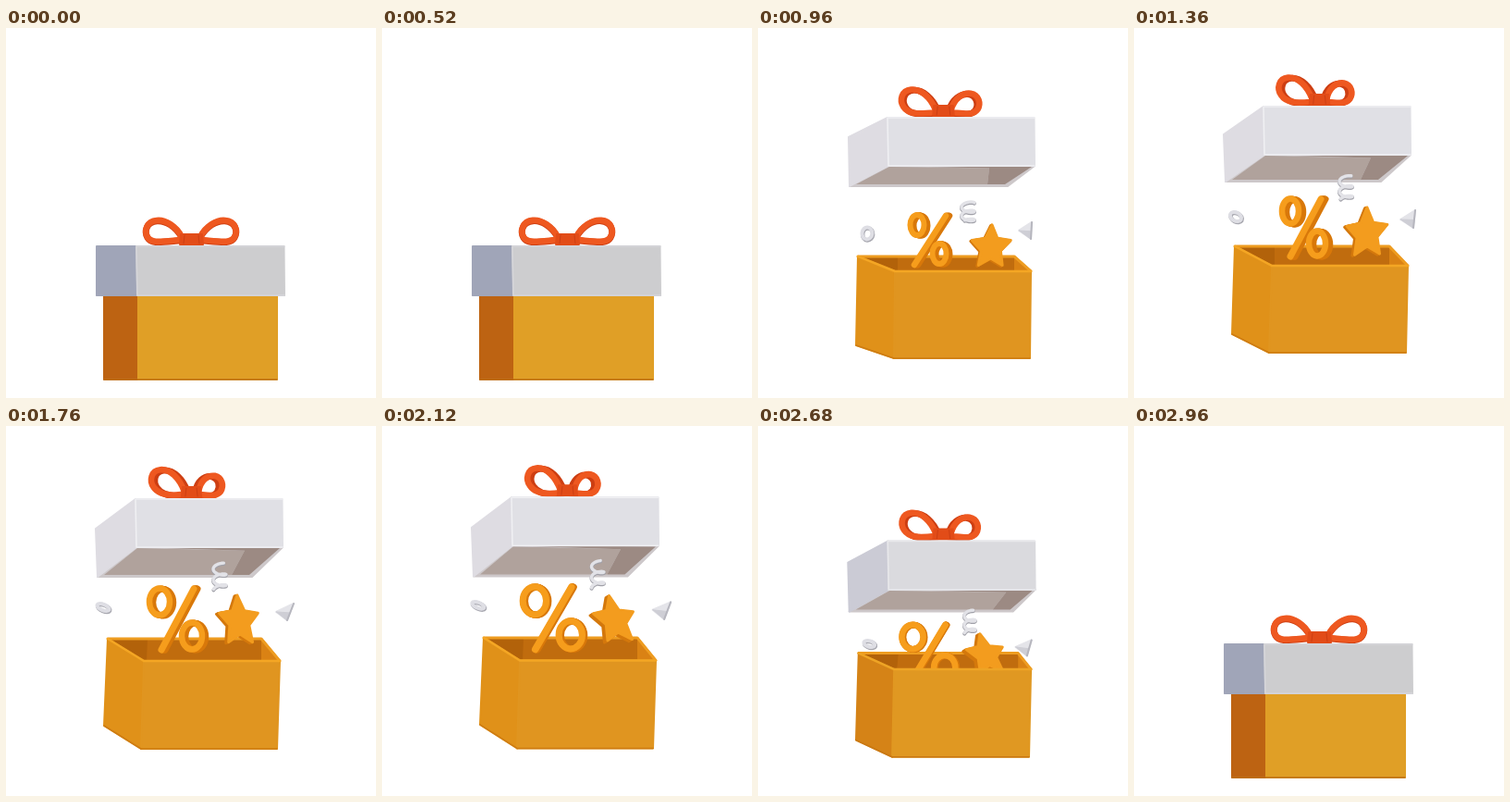
Write an HTML page with a canvas that moves like this. It is 400 by 400 pixels and loops after 3.36 s.

```html
<!DOCTYPE html>
<html lang="en">
<head>
<meta charset="utf-8">
<title>Gift box</title>
<style>
html, body { margin: 0; width: 100%; height: 100%; overflow: hidden; background: #fff; }
canvas { display: block; width: 400px; height: 400px; }
</style>
</head>
<body>
<canvas id="stage" width="400" height="400"></canvas>
<script>
const ctx = document.getElementById('stage').getContext('2d');
const LOOP = 3360;
const TIMES = [520, 960, 1360, 1760, 2520, 2960];
const TAU = Math.PI * 2;

// current segment and eased position inside it
let seg = 0, pos = 0;

function setTime(t) {
  if (t <= TIMES[0] || t >= TIMES[5]) { seg = 0; pos = 0; return; }
  seg = 0;
  while (t >= TIMES[seg + 1]) seg++;
  const u = (t - TIMES[seg]) / (TIMES[seg + 1] - TIMES[seg]);
  if (seg === 0) pos = 1 - Math.pow(1 - Math.pow(u, 1.3), 2.2);
  else if (seg === 4) pos = u * u * (3 - 2 * u);
  else pos = u + 0.33 * u * (1 - u);
}

const lerp = (a, b, u) => a + (b - a) * u;

// value for: closed, then four open poses, then closed again
function key(...v) {
  return lerp(v[seg], seg === 4 ? v[0] : v[seg + 1], pos);
}

function tint(a, b, u) {
  return 'rgb(' + a.map((c, i) => Math.round(lerp(c, b[i], u))).join(',') + ')';
}

function poly(pts, fill, round = 2) {
  ctx.beginPath();
  pts.forEach(([x, y]) => ctx.lineTo(x, y));
  ctx.closePath();
  ctx.fillStyle = ctx.strokeStyle = fill;
  ctx.lineWidth = round;
  ctx.fill();
  if (round) ctx.stroke();
}

function line(pts, color, width) {
  ctx.beginPath();
  pts.forEach(([x, y]) => ctx.lineTo(x, y));
  ctx.strokeStyle = color;
  ctx.lineWidth = width;
  ctx.stroke();
}

function lidShape() {
  const top = key(235, 96, 84, 78, 75) + 1;
  const base = key(290, 150, 138, 132, 129) - 1;
  return {
    top, base,
    sideTop: key(235, 117, 114, 110, 108) + 1,
    sideBase: key(290, 172, 167, 164, 163) - 1,
    xl: key(98, 98, 97, 97, 97), xb: key(98, 99, 99, 99, 99),
    xf: key(141, 140, 140, 140, 140),
    xr: key(301, 299, 299, 299, 299),
    xBack: key(300, 270, 267, 266, 265)
  };
}

function boxShape() {
  return {
    top: key(285, 262, 256, 253, 252) + 1,
    base: key(380, 357, 351, 349, 348),
    back: key(285, 246, 235, 229, 227) + 1,
    sideBase: key(380, 343, 331, 324, 322),
    xl: key(106, 108, 109, 110, 110), xlb: 106,
    xf: key(143, 148, 149, 149, 149), xfb: key(143, 147, 146, 146, 146),
    xr: key(293, 295, 296, 296, 296), xrb: key(293, 294, 294, 293, 293),
    xBack: key(293, 277, 276, 276, 276)
  };
}

function lidInside(l) {
  poly([[l.xf, l.base], [l.xr, l.base], [l.xBack, l.sideBase], [l.xb, l.sideBase]], 'rgb(205,200,202)');
  const h = l.sideBase - l.base;
  if (h < 4) return;
  const cx = key(292, 250, 256, 258, 258), cy = l.base + h * 0.12;
  poly([[l.xf + 2, l.base + 1], [cx, cy], [l.xBack - 22, l.sideBase - 2], [l.xb + 7, l.sideBase - 2]], 'rgb(176,162,156)', 0);
  poly([[l.xf, l.base], [l.xr - 3, l.base + 1], [l.xBack - 3, l.sideBase - 2],
    [l.xBack - 22, l.sideBase - 2], [cx, cy]], 'rgb(156,138,131)', 0);
}

function lidOutside(l, open) {
  const side = tint([160, 165, 184], [222, 220, 226], open);
  const front = tint([205, 205, 207], [224, 224, 229], open);
  poly([[l.xf, l.top], [l.xf + 1, l.base], [l.xb, l.sideBase], [l.xl, l.sideTop]], side);
  poly([[l.xf, l.top], [l.xr - 0.5, l.top], [l.xr, l.base], [l.xf + 1, l.base]], front);
  const edge = tint([214, 214, 218], [240, 240, 243], open);
  line([[l.xr, l.top], [l.xf, l.top], [l.xf + 1, l.base], [l.xr, l.base]], edge, 1.5);
}

function boxInside(b) {
  const { xl, xf, xr, xBack, top, back } = b;
  poly([[xl, back], [xBack, back], [xr, top], [xf, top]], 'rgb(192,108,14)');
  poly([[xl, back], [xl + 43, back], [xf + 3, top]], 'rgb(178,98,10)', 0);
  poly([[xBack, back], [xr, top], [xBack, top]], 'rgb(218,130,20)', 0);
  line([[xl, back], [xBack, back], [xr, top]], 'rgb(238,156,32)', 3);
}

function boxOutside(b, open) {
  const side = tint([189, 99, 18], [224, 145, 25], open);
  const front = tint([224, 159, 38], [224, 149, 32], open);
  poly([[b.xl, b.back], [b.xf, b.top], [b.xfb, b.base], [b.xlb, b.sideBase]], side);
  poly([[b.xf, b.top], [b.xr, b.top], [b.xrb, b.base], [b.xfb, b.base]], front);
  const edge = tint([224, 159, 38], [244, 166, 36], open);
  line([[b.xl, b.back], [b.xf, b.top], [b.xr, b.top]], edge, 2.5);
  line([[b.xlb, b.sideBase], [b.xfb, b.base], [b.xrb, b.base]], tint([190, 112, 22], [206, 124, 18], open), 1.5);
}

const SHUT = [-10, -9, -16, -21, -28, -28, -37, -27, -48, -26, -51, -16, -47, -9, -43, -2, -34, -4, -10, -6];
const LEFT = [-7, -7, -12, -21, -22, -32, -33, -31, -43, -30, -45, -19, -40, -12, -34, -3, -22, -2, -8, -4];
const RIGHT = [8, -7, 10, -19, 17, -25, 25, -24, 33, -22, 35, -13, 31, -7, 26, -1, 18, -3, 8, -4];

function loop(end, flip, y, tilt, dx, color, width) {
  const p = SHUT.map((c, i) => i % 2
    ? y + lerp(c, end[i], tilt)
    : 200 + dx + lerp(c * flip, end[i], tilt));
  ctx.beginPath();
  ctx.moveTo(p[0], p[1]);
  for (let i = 2; i < 20; i += 6) ctx.bezierCurveTo(...p.slice(i, i + 6));
  ctx.strokeStyle = color;
  ctx.lineWidth = width;
  ctx.stroke();
}

function bow(y, tilt) {
  const dark = 'rgb(205,62,18)', lit = 'rgb(238,88,32)';
  for (const [end, flip] of [[LEFT, 1], [RIGHT, -1]]) {
    loop(end, flip, y + 0.8, tilt, 4 * tilt * flip, dark, 7);
    loop(end, flip, y, tilt, 0, lit, 6.6);
  }
  const x = lerp(189, 191, tilt), w = lerp(23, 19, tilt);
  poly([[x, y - 12], [x + w, y - 12], [x + w + 1, y - 1], [x - 1, y - 1]], 'rgb(226,76,24)');
  line([[x + 4, y - 11], [x + 3, y - 2]], dark, 1);
  line([[x + w - 4, y - 11], [x + w - 3, y - 2]], dark, 1);
}

function ring(x, y, rx, ry, color, width, turn = 0) {
  ctx.beginPath();
  ctx.ellipse(x, y, rx, ry, turn, 0, TAU);
  ctx.strokeStyle = color;
  ctx.lineWidth = width;
  ctx.stroke();
}

function percent() {
  const x1 = key(194, 203, 202, 203, 206), y1 = key(312, 203, 185, 176, 173);
  const x2 = key(172, 169, 169, 168, 164), y2 = key(352, 256, 247, 242, 241);
  const ax = key(174, 172, 169, 166, 164), ay = key(320, 213, 198, 190, 188);
  const bx = key(192, 196, 198, 201, 206), by = key(344, 244, 233, 227, 225);
  const rx = key(6, 7.5, 9, 11, 14), ry = key(8, 11, 13.5, 14.5, 15.5);
  const depth = key(3, 4, 5, 4, 1);
  const w = key(5, 6.5, 7, 7, 8);
  for (let i = 4; i >= 0; i--) {
    const d = depth * i / 4;
    const c = i ? 'rgb(216,120,10)' : 'rgb(246,157,28)';
    ring(ax + d, ay + d * 0.2, rx, ry, c, w - 0.5);
    ring(bx + d, by + d * 0.2, rx, ry, c, w - 0.5);
    line([[x1 + d, y1], [x2 + d, y2]], c, w);
  }
}

function star() {
  const cx = key(235, 252, 252, 252, 252), cy = key(335, 237, 222, 211, 209);
  const ax = key(15, 22, 23, 22, 23), ay = key(0, 0, -1, 0, -2);
  const bx = key(0, -1, 0, 2, 10), by = key(17, 24, 28, 28, 25);
  const pts = [];
  for (let i = 0; i < 10; i++) {
    const a = i * TAU / 10, r = i % 2 ? 0.5 : 1;
    const u = r * Math.sin(a), v = -r * Math.cos(a);
    pts.push([cx + u * ax + v * bx, cy + u * ay + v * by]);
  }
  const dx = key(-2, -1.5, -2.5, -3, -4), dy = key(0, 1, 1, 1, 3);
  for (let i = 3; i >= 0; i--) {
    poly(pts.map(([x, y]) => [x + dx * i / 3, y + dy * i / 3]),
      i ? 'rgb(212,120,12)' : 'rgb(243,156,30)', 3);
  }
}

function hoop() {
  const x = key(160, 118, 110, 105, 103), y = key(335, 222, 204, 196, 192);
  const rx = key(4, 5.5, 6.5, 7, 7), ry = key(4, 6.5, 4.5, 3.2, 2.8);
  const turn = key(0, 0.1, 0.5, 0.4, 0.4);
  ring(x + 0.7, y + 1, rx, ry, 'rgb(168,168,176)', 4.5, turn);
  ring(x, y, rx, ry, 'rgb(222,222,228)', 4, turn);
}

function spring() {
  const cx = key(215, 227, 229, 231, 235), cy = key(335, 200, 174, 164, 160);
  const h = key(14, 21, 25, 27, 27), w = key(5, 7, 7, 7, 6.5);
  const start = key(0, 0.2, 0.6, 0.9, 1.3);
  for (const [off, color, width] of [[0.9, 'rgb(160,160,168)', 4], [0, 'rgb(226,226,231)', 3.4]]) {
    const pts = [];
    for (let i = 0; i <= 50; i++) {
      const u = i / 50, a = start + u * TAU * 2.3;
      pts.push([cx + w * Math.cos(a), cy + (u - 0.5) * h - 3 * Math.sin(a) + off]);
    }
    line(pts, color, width);
  }
}

function cone() {
  const tip = [key(245, 282, 288, 292, 293), key(335, 219, 207, 201, 197)];
  const a = [key(256, 296, 304, 311, 313), key(329, 210, 197, 192, 189)];
  const b = [key(256, 295, 302, 304, 306), key(341, 228, 216, 210, 208)];
  const m = [lerp(a[0], b[0], 0.55), lerp(a[1], b[1], 0.55)];
  poly([tip, a, b], 'rgb(228,228,233)', 2);
  poly([tip, m, b], 'rgb(206,206,213)', 1);
  line([a, b], 'rgb(182,182,190)', 2);
}

function draw(t) {
  setTime(t);
  ctx.fillStyle = '#fff';
  ctx.fillRect(0, 0, 400, 400);
  ctx.lineJoin = ctx.lineCap = 'round';
  ctx.save();

  // small rocking before the lid pops
  if (t > 200 && t < 520) {
    const u = (t - 200) / 320;
    const deg = -Math.sin(u * TAU) * (1.6 - 0.5 * u);
    ctx.translate(200, 381);
    ctx.rotate(deg * Math.PI / 180);
    ctx.translate(-200, -381);
  }

  const open = key(0, 1, 1, 1, 1);
  const lid = lidShape(), box = boxShape();
  boxInside(box);
  lidInside(lid);
  if (open > 0) {
    hoop();
    cone();
    spring();
    percent();
    star();
  }
  boxOutside(box, open);
  bow(lid.top - 1, key(0, 0.6, 0.85, 0.94, 1));
  lidOutside(lid, open);
  ctx.restore();
}

const t0 = performance.now();
function tick() {
  draw((performance.now() - t0) % LOOP);
  requestAnimationFrame(tick);
}
tick();
</script>
</body>
</html>
```
